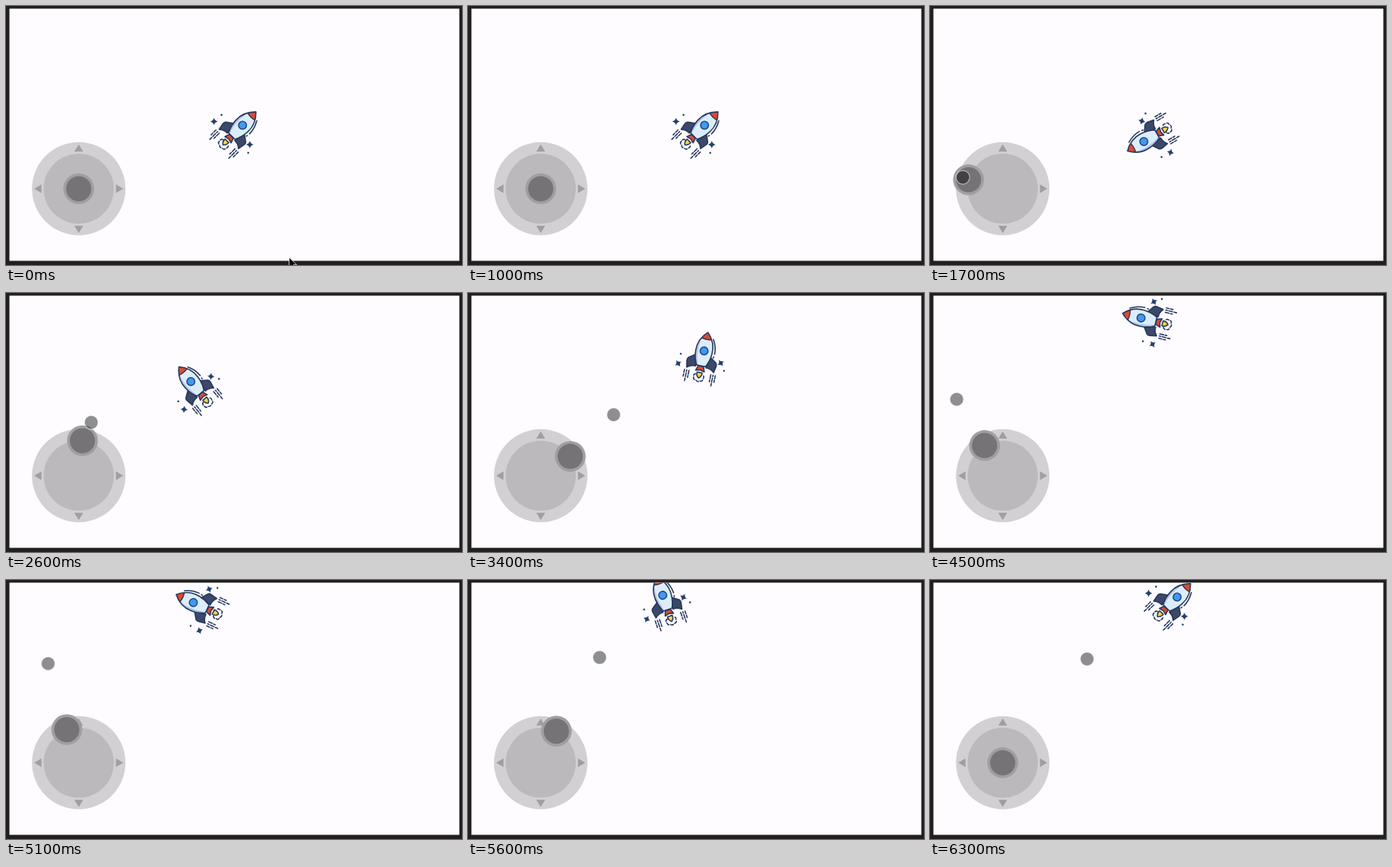
Write an HTML page that moves like this. It is 600 px wide and 342 px high and loops after 6600 ms.

```html
<!DOCTYPE html>
<html lang="en">
<head>
<meta charset="utf-8">
<title>Joystick rocket</title>
<style>
  html, body { margin: 0; width: 100%; height: 100%; overflow: hidden; background: #231f21; }
  svg { display: block; width: 600px; height: 342px; }
</style>
</head>
<body>
<svg viewBox="0 0 600 342">
  <defs>
    <clipPath id="screen"><rect x="4.5" y="3.5" width="592" height="333"/></clipPath>
    <path id="body" d="M0-41.5C9-33 11.500-24 11-15Q10.500-5 6 3.500H-6Q-10.500-5-11-15C-11.500-24-9-33 0-41.500Z"/>
    <clipPath id="hull"><use href="#body"/></clipPath>
    <path id="fin" d="M10-10L18.500-4Q20-2.500 19.700 0L18 9Q13 4.500 7 5Z"/>
    <path id="star" d="M0-5Q.9-.9 5 0Q.9.9 0 5Q-.9.9-5 0Q-.9-.9 0-5Z"/>
    <path id="arrow" d="M0-58.500L5.800-49H-5.800Z"/>
    <path id="trail" d="M-3 0V4M-3 6V9M0 0V2M0 4V9M0 11V14.500M3 0V5M3 7V9.500"/>
  </defs>
  <rect width="600" height="342" fill="#231f21"/>
  <rect x="4.5" y="3.5" width="592" height="333" fill="#fefcff"/>

  <g clip-path="url(#screen)">
    <g id="rocket">
      <g transform="translate(-1.6 -.2)" stroke="#27395f" stroke-width="1.6" stroke-linejoin="round" stroke-linecap="round" fill="none">
        <g fill="#24406f" stroke="none">
          <use href="#star" transform="translate(-30 6.500) rotate(-45)"/>
          <use href="#star" transform="translate(24.800 -5.300) rotate(-45)"/>
          <circle cx="-29.300" cy="-6.700" r="1.300"/>
          <circle cx="31" cy="3.900" r="1.300"/>
        </g>
        <use href="#trail" x="-17.300" y="12.500"/>
        <use href="#trail" transform="translate(18 12.500) scale(-1 1)"/>
        <path d="M9-34Q14.500-25 14.500-15M14-11.500L13.700-10"/>
        <use href="#fin" fill="#3c4868"/>
        <use href="#fin" transform="scale(-1 1)" fill="#3c4868"/>
        <path d="M-4.500 15Q-8 16-6.500 19.500Q-7 23.500-3 23Q-.5 26 2 23.500Q6.500 24 6 20Q8 16.500 4.500 15" fill="#fefcff" stroke-dasharray="4 2"/>
        <path d="M-3.300 12.500Q-4 17 0 20Q4 17 3.300 12.500Z" fill="#f4d448"/>
        <path d="M-3.500 4H3.500L5.800 10.500L0 9L-5.800 10.500Z" fill="#dd4a31"/>
        <g clip-path="url(#hull)" stroke="none">
          <rect x="-14" y="-44" width="28" height="52" fill="#dcedfa"/>
          <path d="M-14-44H0Q-9-32-8-16Q-7.500-4-3 6H-14Z" fill="#b2c3e7"/>
          <path d="M-12-44H12V-33Q0-30-12-33Z" fill="#dd4a31"/>
        </g>
        <path d="M-6-33Q0-31 6-33" stroke-width="1.300"/>
        <use href="#body"/>
        <circle cy="-16.600" r="5.200" fill="#4299ee" stroke="#234b86"/>
      </g>
    </g>
  </g>

  <g transform="translate(95.7 241.300)">
    <circle r="61.500" fill="#d2d0d3"/>
    <circle r="46.200" fill="#bbb9bc"/>
    <g fill="#a09ea1">
      <use href="#arrow"/>
      <use href="#arrow" transform="rotate(90)"/>
      <use href="#arrow" transform="rotate(180)"/>
      <use href="#arrow" transform="rotate(270)"/>
    </g>
    <g id="knob">
      <circle r="20.300" fill="#a09ea1"/>
      <circle r="16.600" fill="#757376"/>
    </g>
    <circle id="touch" r="9" fill="#000" fill-opacity=".44" stroke="#fff" stroke-opacity=".55" stroke-width="1.200"/>
  </g>

  <path id="cursor" d="M0 0V13.500L3.200 10.600L5.500 15.500L7.800 14.500L5.600 9.700H10Z" fill="#000" stroke="#fff" stroke-width=".8"/>
</svg>

<script>
const LOOP = 6600, STEP = 100, LAST = 6300;
const PRESS = 1300, DRAG = 1400, RELEASE = 6200, KEY_GAP = 300;
const REACH = 46.5, LAG = 45;
const HOME = { x: 300.5, y: 170.5 }, CEILING = 35.5, SPEED = 0.092;

// Finger offsets from the stick's hub, evenly spaced in time.
const finger = [
  [-4, -1], [-52.5, -15], [-70, -38], [-39, -72], [16.5, -70.5], [77, -52],
  [103, -26], [80, -103], [-30, -85], [-62, -62], [-61, -100], [-59, -97],
  [-52, -125], [-4, -138], [77.5, -139], [94, -138], [111, -137]
];

const byId = id => document.getElementById(id);
const rocket = byId('rocket'), knob = byId('knob'), touch = byId('touch'), cursor = byId('cursor');
const clamp = (v, low, high) => Math.max(low, Math.min(high, v));

function spline(a, b, c, d, u) {
  return b + u / 2 * (c - a + u * (2 * a - 5 * b + 4 * c - d + u * (3 * (b - c) + d - a)));
}

function fingerAt(t) {
  if (t < DRAG) return { x: 0, y: 0 };
  const last = finger.length - 1;
  const pos = clamp((t - DRAG) / KEY_GAP, 0, last);
  const i = Math.floor(pos);
  const keys = [-1, 0, 1, 2].map(n => finger[clamp(i + n, 0, last)]);
  const axis = n => spline(...keys.map(key => key[n]), pos - i);
  return { x: axis(0), y: axis(1) };
}

function stickAt(t) {
  if (t >= RELEASE) return { x: 0, y: 0 };
  const p = fingerAt(t - LAG);
  const k = Math.min(1, REACH / (Math.hypot(p.x, p.y) || 1));
  return { x: p.x * k, y: p.y * k };
}

// The rocket moves by a share of the finger's offset on every step.
function rocketAt(t) {
  let { x, y } = HOME;
  for (let s = DRAG; s < Math.min(t, RELEASE); s += STEP) {
    const push = fingerAt(s);
    x += push.x * SPEED;
    y = Math.max(CEILING, y + push.y * SPEED);
  }
  return { x, y };
}

function place(node, p, turn = 0) {
  node.setAttribute('transform', `translate(${p.x} ${p.y}) rotate(${turn})`);
}

function show(node, visible) {
  node.setAttribute('visibility', visible ? 'visible' : 'hidden');
}

function draw(time) {
  const t = Math.min(LAST, Math.floor(time / STEP) * STEP);
  const stick = stickAt(t);
  const heading = Math.atan2(stick.y, stick.x) * 180 / Math.PI;
  place(knob, stick);
  place(rocket, rocketAt(t), 45 + heading);
  place(touch, fingerAt(t));
  place(cursor, { x: 372.5, y: 332 + t * 0.05 });
  show(touch, t >= PRESS);
  show(cursor, t < 200);
}

const begin = performance.now();
function tick() {
  draw((performance.now() - begin) % LOOP);
  requestAnimationFrame(tick);
}
tick();
</script>
</body>
</html>
```
